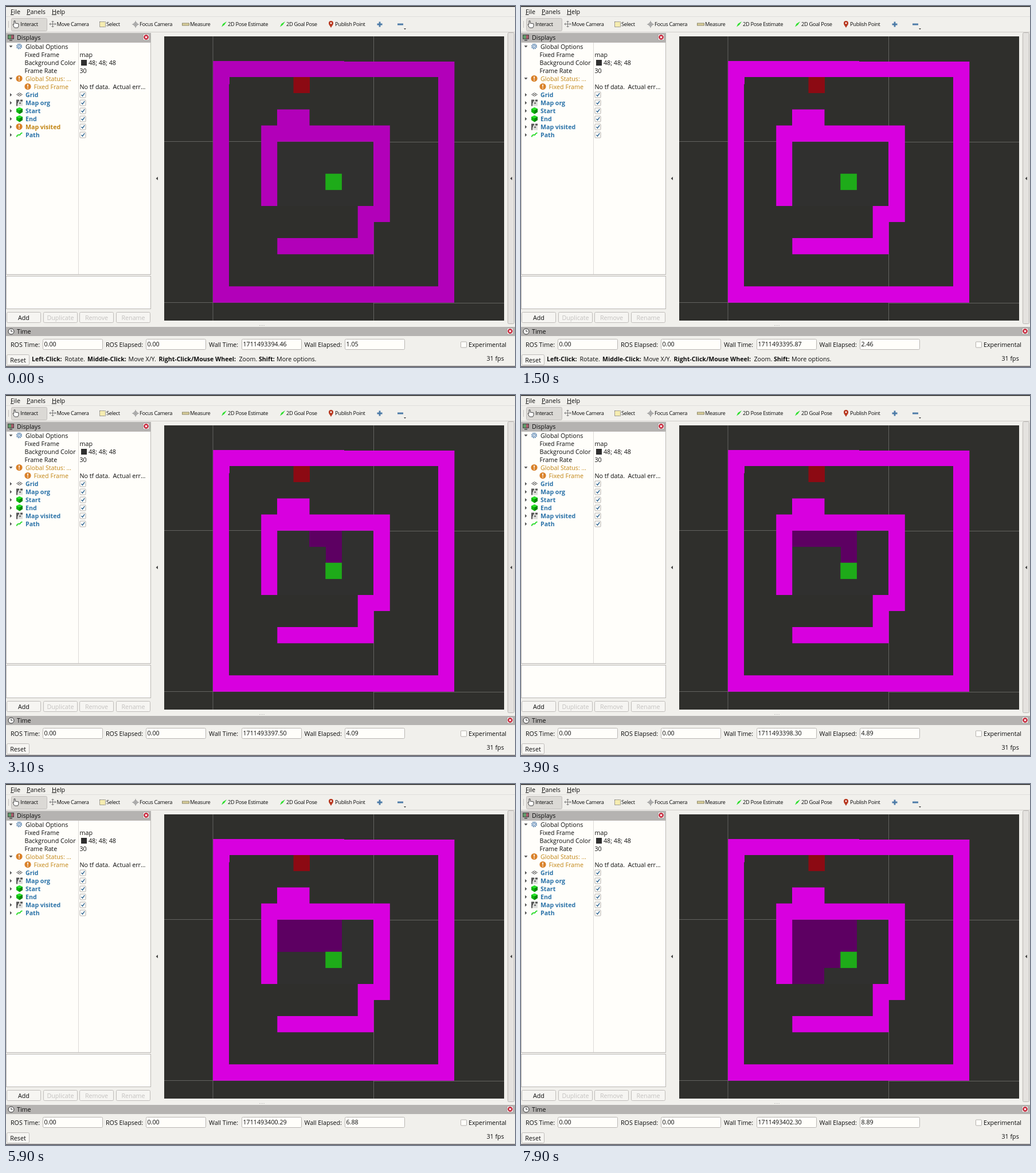
An HTML page for the animation above (8000 ms loop, 888 px wide and 630 px high).

```html
<!DOCTYPE html>
<html lang="en">
<head>
<meta charset="utf-8">
<title>Grid search</title>
<style>
html, body { margin: 0; width: 100%; height: 100%; overflow: hidden; background: #f1f0ec; }
svg { display: block; }
text { font: 500 10.7px "Open Sans", "Noto Sans", sans-serif; fill: #0c0c0c; white-space: pre; }
.tool { font-size: 9.3px; letter-spacing: -.33px; }
.bold { font-weight: 700; font-size: 10.6px; }
.blue { fill: #2a72a8; }
.warn { fill: #c18412; }
.off { fill: #c3c1bf; }
.mid { text-anchor: middle; }
.u { text-decoration: underline; }
</style>
</head>
<body>
<svg id="stage" width="888" height="630" viewBox="0 0 888 630" xmlns="http://www.w3.org/2000/svg"></svg>
<script>
const stage = document.getElementById("stage");
const LOOP = 8000, STEP = 100;
const PAPER = "#fffefa";

function add(tag, attrs, content = "", parent = stage) {
  const el = document.createElementNS("http://www.w3.org/2000/svg", tag);
  for (const key in attrs) el.setAttribute(key, attrs[key]);
  if (content) el.textContent = content;
  parent.appendChild(el);
  return el;
}
const group = () => add("g", {});
const rect = (x, y, width, height, fill, more = {}, parent = stage) =>
  add("rect", { x, y, width, height, fill, ...more }, "", parent);
const box = (x, y, w, h, fill = PAPER, stroke = "#bab7b4", rx = 0) =>
  rect(x + .5, y + .5, w - 1, h - 1, fill, { stroke, rx });
const path = (d, fill, parent = stage) => add("path", { d, fill }, "", parent);
const line = (d, stroke, width = 1, parent = stage) =>
  add("path", { d, stroke, "stroke-width": width, fill: "none" }, "", parent);
const disc = (cx, cy, r, fill, more = {}, parent = stage) =>
  add("circle", { cx, cy, r, fill, ...more }, "", parent);
const label = (x, y, text, cls = "", parent = stage) =>
  add("text", { x, y, class: cls }, text, parent);

// Icons, each centred on x, y
function warning(x, y, parent) {
  disc(x, y, 5.6, "#d9822b", {}, parent);
  line(`M${x} ${y - 3.5}v4M${x} ${y + 1.8}v1.7`, "#fff", 1.6, parent);
}
function mapIcon(x, y, parent) {
  rect(x - 5, y - 5, 11, 11, "#dededb", {}, parent);
  path(`M${x - 5} ${y - 5}h5v3h-2v3h-1v5h-2zM${x + 2} ${y - 5}h4v3h-4zM${x} ${y}h3v2h-3z`, "#555", parent);
}
function cube(x, y) {
  path(`M${x} ${y - 5.5}l5.5 2.5v5.5l-5.5 3.5l-5.5-3.5v-5.5z`, "#0bb50b");
  path(`M${x} ${y - 5.5}l5.5 2.5l-5.5 2.8l-5.5-2.8z`, "#2be32b");
  path(`M${x} ${y - .2}l5.5-2.8v5.5l-5.5 3.5z`, "#078507");
}
function gridIcon(x, y) {
  line(`M${x - 5} ${y}l5-3l5 3l-5 3zM${x - 2.5} ${y - 1.5}l5 3M${x + 2.5} ${y - 1.5}l-5 3`, "#555", .9);
}
function pathIcon(x, y) {
  line(`M${x - 5} ${y + 4}c2-6 4-2 6-4s1-3 4-3`, "#35dd35", 2);
}
function gear(x, y) {
  disc(x, y, 4, "#dbe6f2", { stroke: "#5f87b0", "stroke-width": 2, "stroke-dasharray": "2 1.1" });
  disc(x, y, 1.8, "#fff", { stroke: "#5f87b0" });
}
function arrow(x, y) {
  path(`M${x - 4} ${y + 4.5}L${x - 1.5} ${y - 1}L${x + 5} ${y - 5}L${x + 1} ${y + 1}Z`, "#2ee02e");
}
function closer(x, y) {
  rect(x - 5.5, y - 5.5, 11, 11, "#eeecea", { rx: 2, stroke: "#999694", "stroke-width": .8 });
  disc(x, y, 4.2, "#c4162c");
  line(`M${x - 1.8} ${y - 1.8}l3.6 3.6m0-3.6l-3.6 3.6`, "#fff", 1.4);
}
function checkbox(x, y, on = true) {
  rect(x - 4.5, y - 4.5, 10, 10, PAPER, { stroke: "#b3b0ad", rx: 1 });
  if (on) line(`M${x - 2} ${y + .5}l2 2.2l3.6-5`, "#27608f", 1.4);
}
function button(x, y, w, text, cls = "") {
  box(x, y, w, 19, "#f6f5f2", "#bfbcb9", 2);
  label(x + w / 2, y + 13.5, text, "mid " + cls);
}
const leftArrow = (x, y) => path(`M${x + 1.5} ${y - 3}v6l-3.5-3z`, "#444");

function buildFrame() {
  rect(0, 0, 888, 630, "#f1f0ec");
  rect(0, 0, 888, 1.4, "#111");
  for (const [x, key, rest] of [[8, "F", "ile"], [36, "P", "anels"], [80, "H", "elp"]]) {
    const item = label(x, 13.5, "");
    add("tspan", { class: "u" }, key, item);
    add("tspan", {}, rest, item);
  }
  line("M0 18.5H888", "#e0dedc");
  line("M0 45.5H888", "#d0cdca");
  line("M4.5 26v12", "#c2bfbc", 1);
}

function buildToolbar() {
  box(9, 21, 63, 23, "#dbd9d5", "#c0bdba", 2);
  path("M14 37l-2-5h2v-6h2v4l6 1v4l-1.5 3h-5z", "#fff");
  line("M14 37l-2-5h2v-6h2v4l6 1v4l-1.5 3h-5z", "#333", .9);
  line("M81.5 26v11M76 31.5h11M79.5 28l2-2l2 2M79.5 35l2 2l2-2M78 29.5l-2 2l2 2M85 29.5l2 2l-2 2", "#777", 1);
  rect(163.5, 27.5, 10, 9, "#f5ecb0", { stroke: "#777", "stroke-dasharray": "2 1" });
  disc(226, 32, 3.2, "#ddd", { stroke: "#888" });
  line("M226 26v12M220 32h12", "#888");
  rect(307.5, 30, 12, 4, "#d7cd9a", { stroke: "#7c7758", "stroke-width": .8 });
  arrow(380, 32);
  arrow(482, 32);
  path("M567 38c-2-4-4-5-4-8a4 4 0 0 1 8 0c0 3-2 4-4 8z", "#b83820");
  disc(567, 30, 1.4, "#fff");
  line("M652 27.5v9M647.5 32h9", "#4e7ca8", 2.8);
  line("M683 32h10", "#4e7ca8", 3);
  path("M694 39h4l-2 2.2z", "#444");
  const names = [[25, "Interact"], [88.5, "Move Camera"], [175, "Select"], [233, "Focus Camera"],
    [321, "Measure"], [387, "2D Pose Estimate"], [489, "2D Goal Pose"], [574, "Publish Point"]];
  for (const [x, name] of names) label(x, 35.3, name, "tool");
}

function buildDisplays() {
  rect(0, 47, 253, 16.5, "#b5b3b1");
  rect(3, 50, 11, 8, "#444");
  path("M4 51h5v6h-5z", "#5e9b6a");
  path("M9 51h4v6h-4z", "#a8586a");
  rect(6, 59, 5, 1.5, "#444");
  label(19, 59, "Displays");
  closer(244.5, 54.5);
  box(0, 63, 253, 406);
  line("M126.5 64V468", "#dcdad8");

  const row = i => 70.5 + 14 * i;
  const rows = [
    ["Global Options", 34, ""], ["Fixed Frame", 32.5, "", "map"], ["Background Color", 32.5, "", "48; 48; 48"],
    ["Frame Rate", 32.5, "", "30"], ["Global Status: …", 34, "warn"],
    ["Fixed Frame", 48.5, "warn", "No tf data.  Actual err…"],
    ["Grid", 34, "bold blue"], ["Map org", 34, "bold blue"], ["Start", 34, "bold blue"],
    ["End", 34, "bold blue"], ["Map visited", 34, "bold blue"], ["Path", 34, "bold blue"]
  ];
  rows.forEach(([name, x, cls, value], i) => {
    const y = row(i);
    const text = label(x, y + 4, name, cls);
    if (i === 10) visitedLabel = text;
    if (value) label(i === 2 ? 144 : 128.5, y + 4, value);
    if (i === 0 || i === 4) path(`M5.5 ${y - 1.5}h6l-3 3.5z`, "#555");
    if (i > 5) {
      path(`M7 ${y - 2.5}v6l3.3-3z`, "#555");
      checkbox(133.5, y);
    }
  });
  rect(131, 94, 10, 10, "#303030");
  gear(23, row(0));
  warning(23, row(4));
  warning(38, row(5));
  gridIcon(23.5, row(6));
  mapIcon(23, row(7));
  cube(23.5, row(8));
  cube(23.5, row(9));
  visitedWarn = group();
  warning(23, row(10), visitedWarn);
  visitedOk = group();
  mapIcon(23, row(10), visitedOk);
  pathIcon(23.5, row(11));

  box(0, 471, 253, 58);
  button(1, 534, 60, "Add");
  button(65, 534, 60, "Duplicate", "off");
  button(128, 534, 60, "Remove", "off");
  button(192, 534, 60, "Rename", "off");
  leftArrow(263.5, 301);
  box(875, 46, 12, 509, "#e4e2df", "#bab7b4", 2);
  leftArrow(881.5, 301);
}

const CELL = 28.1;
// Visited cells in search order, as column,row inside the inner room
const route = "31 30 20 10 00 01 11 21 22 12 02 03 13".split(" ");

function buildMap() {
  rect(276, 53, 593, 496, "#2f2f2c");
  rect(473, 237, 168, 112, "#30302f");
  line("M361 53V549M641.5 53V549M276 236.5H641V237.5H869M276 517.5H641V518.5H869", "#6a6a67", .9);
  cells = route.map(([col, row]) =>
    rect(473.2 + col * CELL, 236.7 + row * CELL, CELL, CELL, "#5d0062", { "shape-rendering": "crispEdges" }));
  walls = path("M361.3 96H590V97H782.4L782 517.8H361zM390 124V136L389 137V489.3H754V124z" +
    "M473 180.5H529.5V208.5H669.8V377H641.7V433.2H473.3V405H613.7V349H641V236.7H473.2V349H445.2V208.5H473z");
  walls.setAttribute("fill-rule", "evenodd");
  rect(501.5, 124, 28.5, 28, "#8c0a13");
  rect(557.3, 292.7, 28.6, 28.4, "#1eab19");
}

function buildTime() {
  for (let i = 0; i < 4; i++) rect(442 + i * 2.6, 557, 1, 1, "#aaa");
  rect(0, 560, 888, 16, "#b5b3b1");
  disc(9, 568, 5, "#f3f3f3", { stroke: "#333" });
  line("M9 565v3h2.5", "#333");
  label(19, 572, "Time");
  closer(879.5, 567.5);
  const field = (name, x, left, value) => {
    label(x, 595, name);
    box(left, 581, 105, 19, PAPER, "#b8b5b2", 2);
    return label(left + 2.5, 594.2, value);
  };
  field("ROS Time:", 8, 64, "0.00");
  field("ROS Elapsed:", 174, 244, "0.00");
  wallText = field("Wall Time:", 354, 411, "0");
  elapsedText = field("Wall Elapsed:", 520.5, 591, "0");
  checkbox(798, 590.5, false);
  label(807, 595, "Experimental");
  button(1, 608, 40, "Reset");
  label(838.5, 618.5, "31 fps");
  hint = group();
  const parts = [[45, "Left-Click:"], [102.5, "Rotate."], [142, "Middle-Click:"], [213.5, "Move X/Y."],
    [266.5, "Right-Click/Mouse Wheel:"], [406.5, "Zoom."], [441, "Shift:"], [472, "More options."]];
  parts.forEach(([x, text], i) => label(x, 620.3, text, i % 2 ? "" : "bold", hint));
  rect(0, 628, 888, 2, "#77757a");
}

let visitedLabel, visitedWarn, visitedOk, cells, walls, wallText, elapsedText, hint;
buildFrame();
buildToolbar();
buildDisplays();
buildMap();
buildTime();

// Loop time in ms against seconds on the wall clock
const clock = [[0, 394.461], [400, 394.8148], [1500, 395.87], [3100, 397.5], [4800, 399.2], [5900, 400.29], [7900, 402.3]];
const CLOCK_BASE = 1711493000, LAUNCH = 393.4085, SEARCH_START = 395.796;

function wallAt(t) {
  const i = clock.findIndex(([end], k) => k > 0 && t <= end);
  const [t0, w0] = clock[i - 1], [t1, w1] = clock[i];
  return w0 + (w1 - w0) * (t - t0) / (t1 - t0);
}
const show = (el, on) => el.setAttribute("visibility", on ? "visible" : "hidden");

function render(ms) {
  const t = Math.floor(ms % LOOP / STEP) * STEP;
  const wall = wallAt(t);
  const mapReady = t >= 200;
  wallText.textContent = (CLOCK_BASE + wall).toFixed(2);
  elapsedText.textContent = (wall - LAUNCH).toFixed(2);
  walls.setAttribute("fill", mapReady ? "#d800df" : "#b200b9");
  visitedLabel.setAttribute("class", mapReady ? "bold blue" : "bold warn");
  show(visitedOk, mapReady);
  show(visitedWarn, !mapReady);
  show(hint, t < 2300);
  const count = Math.floor((wall - SEARCH_START) / .5);
  cells.forEach((cell, i) => show(cell, i < count));
}

const start = performance.now();
function tick() {
  render(performance.now() - start);
  requestAnimationFrame(tick);
}
tick();
</script>
</body>
</html>
```
